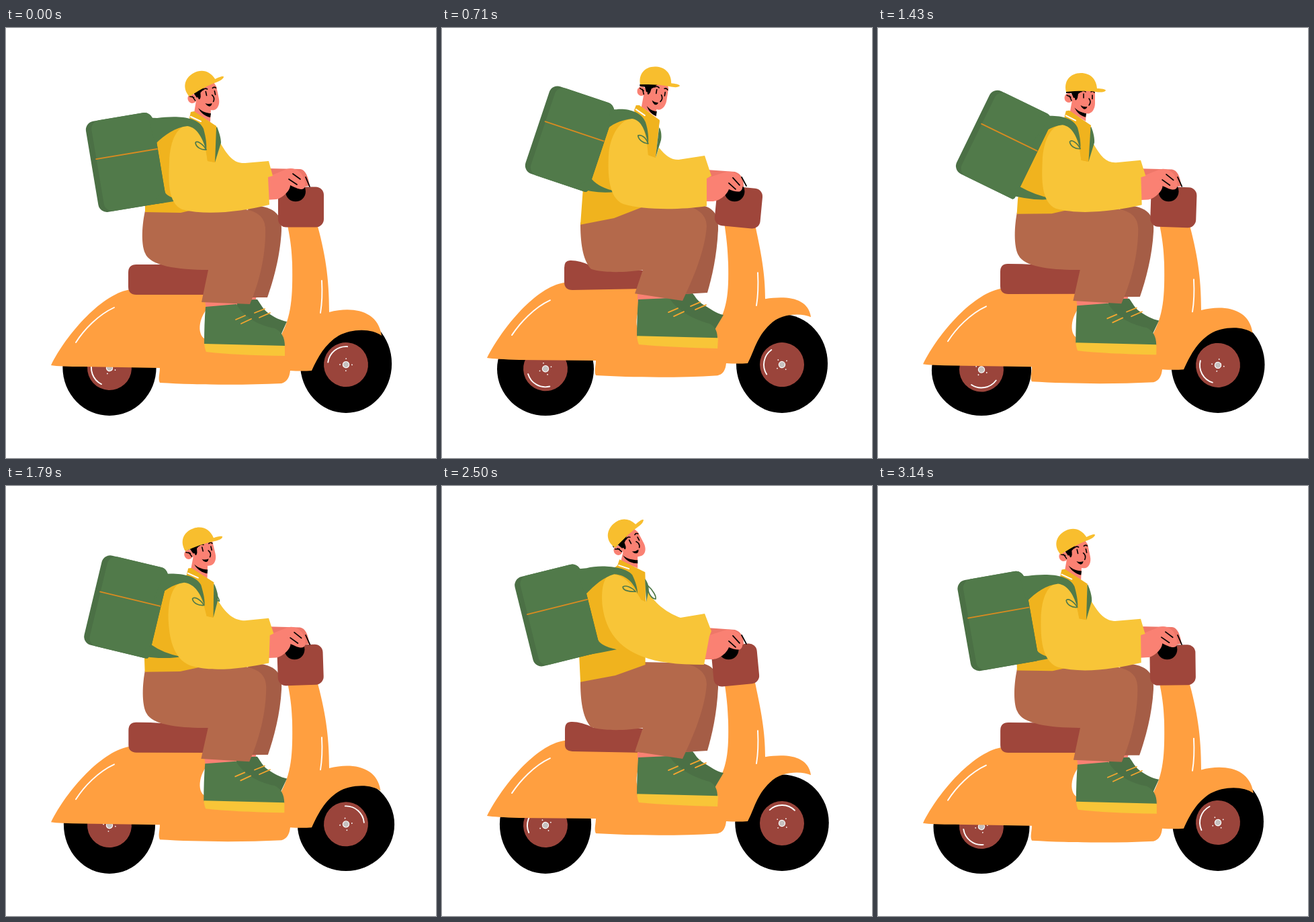
An HTML page with a canvas that plays this animation: 640 px wide and 640 px high, repeating every 3210 ms.

```html
<!DOCTYPE html>
<html lang="en">
<head>
<meta charset="utf-8">
<title>Scooter courier</title>
<style>
html, body { margin: 0; height: 100%; overflow: hidden; background: #fff; }
canvas { display: block; width: 100vmin; height: 100vmin; }
</style>
</head>
<body>
<canvas id="stage" width="640" height="640"></canvas>
<script>
const ctx = document.getElementById('stage').getContext('2d');
const LOOP = 3210, STEPS = 45, RAD = Math.PI / 180;
const ORANGE = '#ff9f40', BROWN = '#9f463b', GREEN = '#517a4a', DARK_GREEN = '#4b7045';
const YELLOW = '#f8c538', DARK_YELLOW = '#f0b31e', SKIN = '#fa8173', PANTS = '#b4694b';
const STITCH = '#f5a62f';
const KEYS = [0, 4, 10, 20, 29, 35, 44];
const NUMBER = /[\d.]+/g;

let step, lean, bob;

// Smooth looping curve through one value per key step.
function curve(values) {
  const n = KEYS.length;
  const time = j => KEYS[(j + n) % n] + STEPS * Math.floor(j / n);
  const value = j => values[(j + n) % n];
  const slope = j => (value(j + 1) - value(j - 1)) / (time(j + 1) - time(j - 1));
  const i = KEYS.filter(key => key <= step).length - 1;
  const h = time(i + 1) - time(i), u = (step - time(i)) / h, w = 1 - u;
  return w * w * ((1 + 2 * u) * value(i) + u * h * slope(i))
       + u * u * ((3 - 2 * u) * value(i + 1) - w * h * slope(i + 1));
}

// Blends two paths of equal structure; x and y have their own amounts.
function blend(from, to, fx, fy) {
  const ends = to.match(NUMBER);
  let i = 0;
  return from.replace(NUMBER, v => {
    const f = i % 2 ? fy : fx;
    return (+v + (ends[i++] - v) * f).toFixed(2);
  });
}
const bounce = (low, high) => blend(low, high, bob, bob);
const sway = (rest, front, back) =>
  blend(rest, lean < 0 ? back : front, Math.abs(lean), bob);

function fill(path, color) {
  ctx.fillStyle = color;
  ctx.fill(new Path2D(path));
}
function line(path, color, width) {
  ctx.strokeStyle = color;
  ctx.lineWidth = width;
  ctx.stroke(new Path2D(path));
}
function oval(x, y, rx, ry, color) {
  ctx.fillStyle = color;
  ctx.beginPath();
  ctx.ellipse(x, y, rx, ry, 0, 0, 7);
  ctx.fill();
}
function box(x, y, w, h, r, color) {
  ctx.fillStyle = color;
  ctx.beginPath();
  ctx.roundRect(x, y, w, h, r);
  ctx.fill();
}
function at(x, y, degrees, draw) {
  ctx.save();
  ctx.translate(x, y);
  ctx.rotate(degrees * RAD);
  draw();
  ctx.restore();
}

function wheel(x, ground, squashPhase, spin) {
  const rx = 71.4 - 3.5 * Math.cos((step * 32 + squashPhase) * RAD);
  const ry = 141.5 - rx;
  oval(x, ground - ry, rx, ry, '#000');
  at(x, ground - 72 + (rx - 68) * .57, step * 32 + spin, () => {
    oval(0, 0, 33, 33, '#9a443b');
    ctx.strokeStyle = '#fff';
    ctx.lineWidth = 1.9;
    ctx.beginPath();
    ctx.arc(0, 0, 27, -.76, .76);
    ctx.stroke();
    for (let i = 0; i < 4; i++) {
      const a = i * Math.PI / 2 + .7;
      oval(9 * Math.cos(a), 9 * Math.sin(a), .9, .9, '#fff');
    }
    oval(0, 0, 5.2, 5.2, '#fff');
    oval(0, 0, 4, 4, '#c6c1bf');
  });
}

function scooter() {
  wheel(154, 577, -60, 160);
  wheel(506, 573, 22, 231);
  fill(bounce(
    'M67 502C90 455 145 393 187 389L300 395L304 413C285 430 283 461 300 464L408 460C425 430 427 400 426 350C425 320 421 305 418 288L462 288C475 335 481 370 481 423C515 414 554 420 559 458C545 447 515 447 495 458C475 470 464 490 455 510Q440 511 423 510C422 520 418 527 410 529C350 532 280 531 229 528C226 522 229 514 229 506L115 504Q80 504 67 502Z',
    'M67 491C90 446 140 385 182 379L300 385L302 402C287 422 286 450 297 455L405 450C425 420 427 395 426 350C425 320 422 305 420 288L465 288C475 335 481 365 481 403C515 398 545 402 549 430C535 424 505 424 488 441C468 460 465 480 455 499Q440 500 423 499C422 509 418 516 410 517C350 521 280 520 229 517C226 511 229 503 229 495L115 494Q80 493 67 491Z'), ORANGE);
  line(bounce('M104 468C116 449 137 427 161 416', 'M104 457C116 439 137 416 161 405'), '#fff', 1.9);
  line(bounce('M470 376C471 395 470 412 468 424', 'M470 364C471 384 470 401 468 413'), '#fff', 1.9);
  fill(sway(
    'M194 352Q220 352 240 352L305 360L305 397L194 397Q182 397 182 385L182 364Q182 352 194 352Z',
    'M192 346Q205 346 222 354L302 361L302 388L194 390Q182 390 182 378L182 357Q182 345 192 346Z',
    'M194 351Q207 351 226 360L302 361L302 397L194 395Q182 394 183 384L183 362Q183 350 194 351Z'), BROWN);
}

function legs() {
  fill(bounce('M360 398L373 398L371 408L360 408Z', 'M358 393L371 393L371 400L358 400Z'), SKIN);
  fill(bounce(
    'M343 411L347 405L374 404C380 412 382 418 390 424C400 431 408 435 418 437L409 457C375 460 345 445 334 412Z',
    'M338 402L345 397L373 395C378 401 380 406 388 411C400 418 407 424 419 427L406 449C370 452 340 437 329 403Z'), DARK_GREEN);
  fill(bounce('M296 406L344 409L344 416L298 417Z', 'M291 396L336 400L336 406L291 407Z'), SKIN);
  fill(bounce(
    'M297 415L343 411C352 427 372 442 400 447C410 452 415 460 415 474L295 471Q295 440 297 415Z',
    'M292 404L338 402C348 417 368 432 398 440C407 444 410 452 410 463L290 460Q290 430 292 404Z'), GREEN);
  fill(bounce('M295 470L415 473L415 488Q340 487 298 482Q296 478 295 470Z',
              'M290 458L411 461L410 477Q335 475 293 471Q291 467 290 458Z'), YELLOW);
  line(bounce('M342 434L356 428M350 440L365 433M370 424L385 418M377 431L393 424',
              'M337 423L351 417M345 429L360 422M370 414L384 408M377 419L393 412'), STITCH, 1.8);
  fill(bounce(
    'M360 264C398 264 411 276 410 302C408 340 398 375 389 401L364 401Z',
    'M360 261C400 261 412 272 411 300C409 340 402 370 395 394L360 396Z'), '#a55d46');
  fill(bounce(
    'M207 272C201 300 202 325 207 335C214 354 255 360 301 360L291 408L363 411C380 372 387 330 386 298C385 278 370 271 345 268L275 262Z',
    'M206 290C206 318 209 345 222 359C240 365 275 364 299 360L287 395L358 406C380 360 392 325 394 295C394 275 375 263 345 263L298 262Z'), PANTS);
}

function handlebar() {
  at(439 + 2.5 * lean, 266.5, 5.5 * lean, () => box(-34, -30, 68, 60, 12, BROWN));
  oval(431 + 4.5 * lean, 243.3, 15, 15, '#000');
  fill(bounce(
    'M390 209L438 210C446 211 450 222 452 235L444 236L430 224L392 224Z',
    'M394 211L436 214C446 217 449 226 449 236L443 237L430 226L394 226Z'), '#ee7769');
  fill(bounce(
    'M386 223L413 212C425 205 438 211 442 221C446 229 447 236 443 239C438 242 430 237 423 234C423 243 410 254 402 255L386 256Z',
    'M386 226L420 215C432 211 443 218 446 226C449 236 447 241 444 243C440 245 432 242 427 240C424 249 412 258 402 258L386 258Z'), SKIN);
  line(sway('M427 217L438 225M421 225L433 233M446 222L452 236',
            'M433 223L443 234M427 231L437 240M446 222L453 235',
            'M433 223L443 234M427 231L437 240M446 222L453 235'), '#000', 1.7);
}

function torso() {
  fill(sway('M283 108L280 126L304 140L305 118Z', 'M301 97L297 118L319 132L320 108Z',
            'M270 95L266 112L291 122L291 98Z'), SKIN);
  fill(sway('M286 119C292 125 300 127 305 127L304 133C298 132 290 127 286 119Z',
            'M305 116C310 122 315 124 320 124L319 131C313 129 308 124 305 116Z',
            'M269 103C275 108 283 110 291 110L291 115C283 115 274 112 269 103Z'), '#000');
  fill(sway(
    'M277 132C260 145 235 152 218 173L208 240L207 258L207 274L260 275L277 271L313 200L313 146Z',
    'M290 122C270 138 255 141 244 149L216 226L210 238L206 293L256 283L300 266L318 192L324 138Z',
    'M265 115C245 130 225 145 211 162L212 236L204 250L206 292L258 282L303 266L303 170L302 128Z'), DARK_YELLOW);
}

function pack() {
  const x = curve([178, 182, 190, 187, 172, 171, 178]);
  const y = curve([200, 187, 164, 172, 185, 192.5, 201]);
  const angle = curve([-9.5, -1, 18.5, 26, .5, -14, -10]);
  const c = Math.cos(angle * RAD), s = Math.sin(angle * RAD);
  const spot = (u, v) => `${x + u * c - v * s} ${y + u * s + v * c}`;

  at(x, y, angle, () => {
    box(-50.5, -68.5, 101, 137, [13, 13, 4, 13], DARK_GREEN);
    box(-42, -68.5, 92.5, 137, [13, 13, 4, 13], GREEN);
    line('M-42.5 -12L49.5 -12', '#d98b20', 1.8);
  });
  const tip = 256 - 13 * bob;
  fill(`M${spot(50, 47)}Q234 ${tip - 5} 260 ${tip}Q236 ${tip + 5} ${spot(28, 68)}Z`, GREEN);

  fill(sway(
    'M272 145C285 146 295 160 300 198L311 200L319 171C331 192 340 202 356 201L391 198L397 220L390 222L392 263C350 273 300 280 262 270C240 260 242 225 243 200C244 165 256 145 272 145Z',
    'M285 135C296 136 304 150 307 189L318 193L323 178C333 190 340 196 352 196L391 190L401 220L394 224L394 265C355 271 300 271 270 262C247 253 247 215 248 190C250 160 265 135 285 135Z',
    'M253 131C270 132 282 145 296 168L303 172L306 157C320 178 335 188 355 196L391 190L401 216L398 224L390 266C350 266 320 262 300 254C262 240 244 215 239 180C236 155 240 132 253 131Z'), YELLOW);
  fill(sway(
    'M275 125L280 124L313 146L311 200L300 198C298 175 290 148 273 134Z',
    'M289 115L294 115L324 137L318 193L307 189C307 165 303 140 286 123Z',
    'M264 109L268 111L302 128L303 172L296 169C290 150 280 130 261 118Z'), DARK_YELLOW);
  line(sway('M275 132L290 139', 'M289 121L302 130', 'M263 118L278 123'), '#fff', 2);

  // Shoulder straps
  fill(`M${spot(44, -60)}` + sway(
    'L225 134C250 131 285 130 294 150C298 165 299 175 298 182C293 165 285 148 270 146C252 148 237 158 222 173Z',
    'L260 121C275 119 297 124 303 140C307 152 308 165 307 172C303 155 298 137 283 135C270 137 258 140 246 150Z',
    'L215 122C235 117 272 119 283 132C288 142 291 152 291 160C286 145 275 132 256 131C240 136 228 146 213 162Z'), GREEN);
  fill(sway('M314 147C318 157 320 165 320 171L311 200L313 148Z',
            'M324 148C327 155 327 162 326 167L318 193L323 150Z',
            'M302 138C307 145 308 150 307 157L304 172L302 140Z'), GREEN);
  line(sway(
    'M298 181C290 182 283 177 282 171C283 167 292 171 298 181M316 165C317 168 317 170 317 172C316 172 316 169 316 165',
    'M307 172C298 171 292 165 292 160C297 158 304 163 307 172M325 160C325 162 325 164 325 166C324 166 324 164 325 160',
    'M288 157C278 157 269 155 269 150C273 147 282 150 288 157M306 148C314 155 319 164 318 168C312 168 306 160 306 148'), GREEN, 1.7);
}

function head() {
  const x = curve([277, 287, 297, 284, 263, 262, 276]);
  const y = curve([105, 102, 94, 104, 99, 96, 105]);
  at(x, y, curve([-12, -4, 9, 0, -24, -28, -12]), () => {
    oval(0, 0, 6.5, 7, SKIN);
    fill('M3 -14L36 -18L39 -10L39 8C39 17 34 23.5 28 23.5C20 23 12 17 6 8Z', SKIN);
    fill('M-4 -10L2 -16L24 -16L17 -8L14 -6L13 0C11 5 9 4 9 0L7 0L4 -7L-4 -7Z', '#000');
    line('M-3 -4L3 -1M1 -3L4 4', '#000', 1.5);
    line('M22 -6L22 0M35 -4L35 1.5M18 -9Q22 -12 25 -9M33 -9Q36 -11 38 -8M30 1Q34 6 30 11', '#000', 1.6);
    fill('M17.5 11Q22 14 27.5 13Q25.5 18 22 16.5Q19 15 17.5 11Z', '#000');
  });
  const capX = curve([273, 283, 295, 280, 258, 258, 272]);
  const capY = curve([102, 97, 84, 95, 96.5, 92, 102]);
  at(capX, capY, curve([-28, -17, 4, 0, -35, -43, -28]), () =>
    fill('M0 0C-4 -16 6 -28 22 -28C36 -28 45 -19 46 -5C52 -5 59 -4 59 -2C57 1 50 1 44 0C30 -2 14 -1 0 0Z', '#f8be2e'));
}

function frame(now) {
  step = Math.floor((now % LOOP + 5) * .014) % STEPS;
  const turn = step / STEPS * 2 * Math.PI;
  lean = Math.sin(turn);
  bob = 1 - Math.abs(Math.cos(turn)) ** 2.6;
  ctx.fillStyle = '#fff';
  ctx.fillRect(0, 0, 640, 640);
  ctx.lineCap = 'round';
  scooter();
  legs();
  handlebar();
  torso();
  pack();
  head();
}

const start = performance.now();
function tick() {
  frame(performance.now() - start);
  requestAnimationFrame(tick);
}
tick();
</script>
</body>
</html>
```
